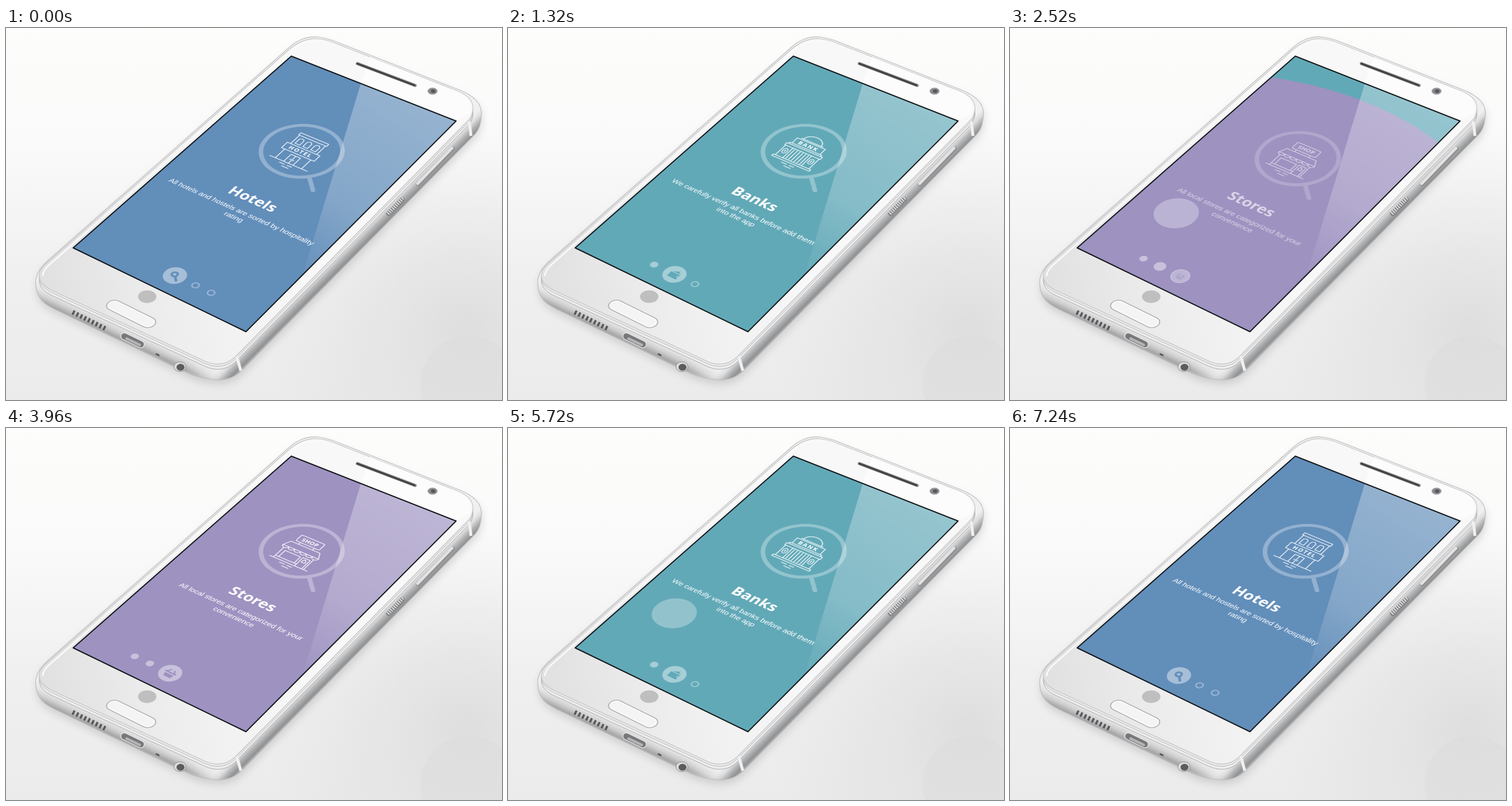
Recreate the animation shown at these times as an HTML page. Size 864x648 px, loop 7400 ms.

```html
<!DOCTYPE html>
<html lang="en">
<head>
<meta charset="utf-8">
<title>Onboarding on a phone</title>
<style>
  html, body { margin: 0; width: 100%; height: 100%; overflow: hidden; background: #f4f4f4; }
  svg { position: absolute; left: 0; top: 0; }
  #plane {
    overflow: visible; transform-origin: 0 0;
    transform: matrix3d(.692417,.292222,0,-.0001337, -.612953,.459016,0,-.00016413, 0,0,1,0, 497,49,0,1);
  }
  #plane text { fill: #fff; text-anchor: middle; }
  .title { font: 700 30px "Open Sans", "Noto Sans", sans-serif; }
  .body { font: 15px "Liberation Sans", Arial, sans-serif; }
  .sign { font: 700 12px "Open Sans", "Noto Sans", sans-serif; stroke: none; }
  .line { fill: none; stroke: #fff; stroke-width: 1.5; stroke-linecap: round; stroke-linejoin: round; }
</style>
</head>
<body>
<svg width="864" height="648">
  <defs>
    <linearGradient id="wall" x2="0" y2="1">
      <stop stop-color="#fdfdfc"/><stop offset=".35" stop-color="#f9f9f9"/>
      <stop offset=".65" stop-color="#f0f0f0"/><stop offset="1" stop-color="#ebebeb"/>
    </linearGradient>
    <radialGradient id="shade" gradientUnits="userSpaceOnUse" cx="800" cy="520" r="350">
      <stop stop-color="#cfcfcf" stop-opacity=".5"/><stop offset="1" stop-color="#d8d8d8" stop-opacity="0"/>
    </radialGradient>
    <linearGradient id="side" gradientUnits="userSpaceOnUse" x1="483" y1="483" x2="503" y2="503">
      <stop stop-color="#f0f0f0"/><stop offset=".3" stop-color="#dcdcdd"/>
      <stop offset=".55" stop-color="#b4b5b7"/><stop offset=".85" stop-color="#909193"/><stop offset="1" stop-color="#acadae"/>
    </linearGradient>
    <linearGradient id="foot" gradientUnits="userSpaceOnUse" x1="216" y1="516" x2="201" y2="548">
      <stop stop-color="#f0f0f0"/><stop offset=".35" stop-color="#e4e4e4"/>
      <stop offset=".6" stop-color="#cdcdce"/><stop offset=".85" stop-color="#a6a6a8"/><stop offset="1" stop-color="#bababb"/>
    </linearGradient>
    <linearGradient id="front" gradientUnits="userSpaceOnUse" x1="70" y1="430" x2="500" y2="330">
      <stop stop-color="#e1e1e1"/><stop offset=".45" stop-color="#eeeeee"/><stop offset="1" stop-color="#f8f8f8"/>
    </linearGradient>
    <linearGradient id="fade" gradientUnits="userSpaceOnUse" x1="310" x2="390">
      <stop stop-color="#fff"/><stop offset="1"/>
    </linearGradient>
    <mask id="left" maskUnits="userSpaceOnUse" x="0" y="0" width="864" height="648">
      <path d="M0 400H60L200 450H420V648H0Z" fill="url(#fade)"/>
    </mask>
    <path id="shell" d="M52 447C50 430 60 417 72 406L492 35C505 22 525 13 545 16Q560 18 575 24L790 108C815 118 830 132 828 152C827 168 824 178 814 188L410 597C398 609 380 615 358 612Q335 609 318 602L85 490C65 480 53 470 52 447Z"/>
    <path id="face" d="M58 432C57 422 65 414 75 406L495 36C508 25 526 17 544 19Q558 20 572 26L787 110C814 121 819 138 808 158L399 573C385 586 368 589 348 581L80 457C66 450 59 443 58 432Z"/>
    <filter id="blur" x="-10%" y="-10%" width="120%" height="120%"><feGaussianBlur stdDeviation="7"/></filter>
  </defs>
  <rect width="864" height="648" fill="url(#wall)"/>
  <rect width="864" height="648" fill="url(#shade)"/>
  <circle cx="806" cy="620" r="84" fill="#d6d6d6" opacity=".3"/>
  <use href="#shell" transform="translate(1 8)" fill="#777" opacity=".25" filter="url(#blur)"/>
  <use href="#shell" fill="url(#side)"/>
  <use href="#shell" fill="url(#foot)" mask="url(#left)"/>
  <use href="#shell" fill="none" stroke="#bdbdbd" stroke-width="1.2"/>
  <use href="#face" y="9" fill="#ededed" stroke="#a9aaac"/>
  <use href="#face" y="4" fill="#e9e9e9" stroke="#b8b9ba"/>
  <use href="#face" fill="url(#front)" stroke="#c4c4c4" stroke-width="1.2"/>
  <path d="M64 432C64 424 69 418 77 411L498 40C510 29 526 22 543 24" fill="none" stroke="#fafafa" stroke-width="2.5"/>
  <path d="M618 97L634 50L788 111Q814 122 808 148L784 162Z" fill="#fff" opacity=".6"/>

  <!-- ports, holes and buttons -->
  <path d="M116 495L174 524" stroke="#57585a" stroke-width="8" stroke-dasharray="3.6 3.9"/>
  <g fill="none" stroke-linecap="round">
    <path d="M206 537L235 551" stroke="#eaeaea" stroke-width="13"/>
    <path d="M206 537L235 551" stroke="#77787a" stroke-width="10.5"/>
    <path d="M210 541L233 552" stroke="#b4b4b6" stroke-width="4.5"/>
    <path d="M262 568L266 570" stroke="#555" stroke-width="3"/>
    <path d="M612 62L713 100" stroke="#b5b5b5" stroke-width="6"/>
    <path d="M612 62L712 100" stroke="#454547" stroke-width="3.6"/>
    <path d="M718 272L778 210" stroke="#8f9092" stroke-width="7.5"/>
    <path d="M717 271L777 209" stroke="#e2e2e3" stroke-width="5"/>
    <path d="M667 323L690 299" stroke="#8b8c8e" stroke-width="10"/>
    <path d="M666 322L689 298" stroke="#d6d6d7" stroke-width="7.5"/>
  </g>
  <path d="M664 325L692 296" stroke="#77787a" stroke-width="7.5" stroke-dasharray="1.6 2.4"/>
  <ellipse cx="303" cy="590" rx="10.5" ry="8.5" fill="#dcdcdc" stroke="#8b8b8d"/>
  <ellipse cx="304" cy="591" rx="7" ry="6" fill="#5b5c5e"/>
  <path d="M402 572L409 597M807 163L810 188" fill="none" stroke="#f0f0f0" stroke-width="5"/>
  <ellipse cx="743" cy="110" rx="8.5" ry="6" fill="#8b8c8f" stroke="#c8c8c8"/>
  <ellipse cx="744" cy="110" rx="4" ry="3" fill="#55575b"/>
  <ellipse cx="246" cy="468" rx="16" ry="11" fill="#bfbfc0"/>
</svg>

<svg id="plane" width="360" height="640" viewBox="0 0 360 640">
  <rect x="133.5" y="698" width="95" height="24" rx="12" fill="#f4f4f4" stroke="#a3a3a4" stroke-width="1.6"/>
  <rect x="135.5" y="700" width="91" height="20" rx="10" fill="none" stroke="#fff" stroke-width="1.5"/>
  <svg width="360" height="640">
    <rect id="back" width="360" height="640"/>
    <circle id="fill"/>
    <g id="pages"></g>
    <g id="dots"></g>
    <circle id="touch" cy="478" fill="#fff"/>
  </svg>
</svg>

<svg width="864" height="648">
  <linearGradient id="glare" gradientUnits="userSpaceOnUse" x1="690" y1="110" x2="500" y2="425">
    <stop stop-color="#fff" stop-opacity=".33"/><stop offset=".6" stop-color="#fff" stop-opacity=".22"/>
    <stop offset="1" stop-color="#fff" stop-opacity=".02"/>
  </linearGradient>
  <path d="M618 97L784 162L517 429Z" fill="url(#glare)"/>
  <path d="M497 49L784 162L418 529L117 383Z" fill="none" stroke="#15181b" stroke-width="2" stroke-linejoin="round"/>
</svg>

<script>
const $ = id => document.getElementById(id);
const repeat = (list, draw) => list.map(draw).join('');
const path = d => `<path d="${d}"/>`;
const sign = (word, y, gap) => `<text class="sign" y="${y}" letter-spacing="${gap}">${word}</text>`;
const ground = 'M-40 41H40M-15 47H-4M1 47H11M-6 53H8';

const hotel = path(ground + 'M-30 -34V-41H30V-34ZM-28 -34V-6M28 -34V-6M-35 -6H35V12H-35ZM-28 12V41M28 12V41M-10 41V18H10V41M0 18V41M-3 29V32M3 29V32')
  + repeat([-17, 0, 17], x => path(`M${x - 5} -11V-23a5 5 0 0 1 10 0V-11Z`)) + sign('HOTEL', 7.5, 2);

const bank = path(ground + 'M-19 -27a19 16 0 0 1 38 0M-23 -27H23M-30 -24H30V-7H-30ZM-38 -3H38V4H-38ZM-34 -3V-7H34V-3M-36 4V36M36 4V36M-40 41V36H40V41M-20 4V36M20 4V36')
  + repeat([-12, 0, 12], x => path(`M${x - 3} 6V34M${x + 3} 6V34`))
  + repeat([-28, 28], x => `<rect x="${x - 4}" y="11" width="8" height="14" rx="4"/>` + path(`M${x} 15V21`))
  + sign('BANK', -11, 2);

const shop = path(ground + 'M-15 -18V-12M15 -18V-12M-31 -12H31L38 3H-38ZM-32 10V41M32 10V41M-25 15H8V35H-25ZM13 41V14H28V41M-32 35H13M17 22L20 17L24 22V26H17Z')
  + '<rect x="-25" y="-37" width="50" height="19" rx="3"/>'
  + repeat([-38, -25.3, -12.7, 0, 12.7, 25.3], x => path(`M${x} 3a6.3 6 0 0 0 12.7 0`)) + sign('SHOP', -22.5, .4);

const pages = [
  { color: '#628eba', title: 'Hotels', art: hotel, text: ['All hotels and hostels are sorted by hospitality', 'rating'],
    badge: c => `<circle cx="-2" cy="-2" r="5" fill="none" stroke="${c}" stroke-width="4"/><path d="M2 2L9 9" stroke="${c}" stroke-width="4.5" stroke-linecap="round"/>` },
  { color: '#62a9b8', title: 'Banks', art: bank, text: ['We carefully verify all banks before add them', 'into the app'],
    badge: c => `<path d="M-9 -4L5 -10V-6H9V9H-9Z" fill="${c}"/><path d="M-9 -4H9M5 2H9" stroke="#fff" stroke-opacity=".5" stroke-width="1.5"/>` },
  { color: '#9e92c1', title: 'Stores', art: shop, text: ['All local stores are categorized for your', 'convenience'],
    badge: c => `<path d="M-11 -3H11V0H-11ZM-9 2H9L7 10H-7Z" fill="${c}"/><path d="M-7 -3L-3 -9M7 -3L3 -9" stroke="${c}" stroke-width="2.5"/>` },
];

$('pages').innerHTML = repeat(pages, p => `<g>
  <g transform="translate(176 219.5)">
    <g fill="none" stroke="#fff" opacity=".31" stroke-width="8" stroke-linecap="round">
      <circle r="72"/><path d="M51 51L78 78"/>
    </g>
    <g class="line">${p.art}</g>
  </g>
  <g>
    <text class="title" x="180" y="383">${p.title}</text>
    <text class="body" x="180" y="415">${p.text[0]}</text>
    <text class="body" x="180" y="433">${p.text[1]}</text>
  </g>
</g>`);
$('dots').innerHTML = repeat(pages, p => `<g>
  <circle fill="#fff" stroke="#fff" stroke-width="2" opacity=".43"/><g>${p.badge(p.color)}</g>
</g>`);

const LOOP = 7400, SLIDE = 540;
// start of the touch, page before, page after, wait before the slide
const swipes = [[80, 0, 1, 180], [2000, 1, 2, 180], [3960, 2, 1, 180], [5640, 1, 0, 130]];
const firstDot = [185.2, 137.3, 100.4];

const clamp = x => Math.max(0, Math.min(1, x));
const ease = x => x < .5 ? 2 * x * x : 1 - 2 * (1 - x) ** 2;
const mix = (a, b, k) => a + (b - a) * k;
const set = (el, attrs) => { for (const k in attrs) el.setAttribute(k, attrs[k]); };

function drawDots(from, to, e) {
  const p = mix(from, to, e);
  const open = pages.map((_, i) => Math.max(0, 1 - Math.abs(i - p)));
  const xs = [mix(firstDot[from], firstDot[to], e)];
  for (let i = 1; i < 3; i++) xs[i] = xs[i - 1] + 32 + 10.7 * (open[i - 1] + open[i]);
  [...$('dots').children].forEach((dot, i) => {
    const [disc, badge] = dot.children;
    set(dot, { transform: `translate(${xs[i]} 599)` });
    set(disc, { r: 6 + 13 * open[i], 'fill-opacity': i <= p ? 1 : open[i] });
    set(badge, { opacity: clamp(2 * open[i] - 1), transform: `scale(${open[i]})` });
  });
  return xs[to];
}

function drawPage(page, alpha, shift) {
  const [picture, words] = page.children;
  set(page, { opacity: alpha });
  set(picture, { transform: `translate(176 ${219.5 + shift})` });
  set(words, { transform: `translate(0 ${.65 * shift})` });
}

function drawTouch(s, dir) {
  const shown = clamp(s / 100) * clamp((700 - s) / 150);
  const k = ease(clamp((s - 100) / 340));
  set($('touch'), {
    cx: dir > 0 ? mix(289, 86, k) : mix(86, 282, k),
    r: 29 + 10 * Math.min(1, shown * 1.2),
    opacity: .3 * Math.min(1, shown * 1.5),
  });
}

function draw(t) {
  const [start, from, to, wait] = swipes.findLast(s => t >= s[0]) || swipes[0];
  const s = t - start;
  const e = ease(clamp((s - wait) / SLIDE));
  const center = drawDots(from, to, e);
  set($('back'), { fill: pages[from].color });
  set($('fill'), { fill: pages[to].color, cx: center, cy: 599, r: 760 * e });
  [...$('pages').children].forEach((page, i) => {
    if (i === from) drawPage(page, clamp(1 - 2 * e), -90 * e);
    else if (i === to) drawPage(page, clamp(1.6 * e - .55), 90 * (1 - e));
    else drawPage(page, 0, 0);
  });
  drawTouch(s, to - from);
}

const zero = performance.now();
function tick() {
  draw((performance.now() - zero) % LOOP);
  requestAnimationFrame(tick);
}
tick();
</script>
</body>
</html>
```
